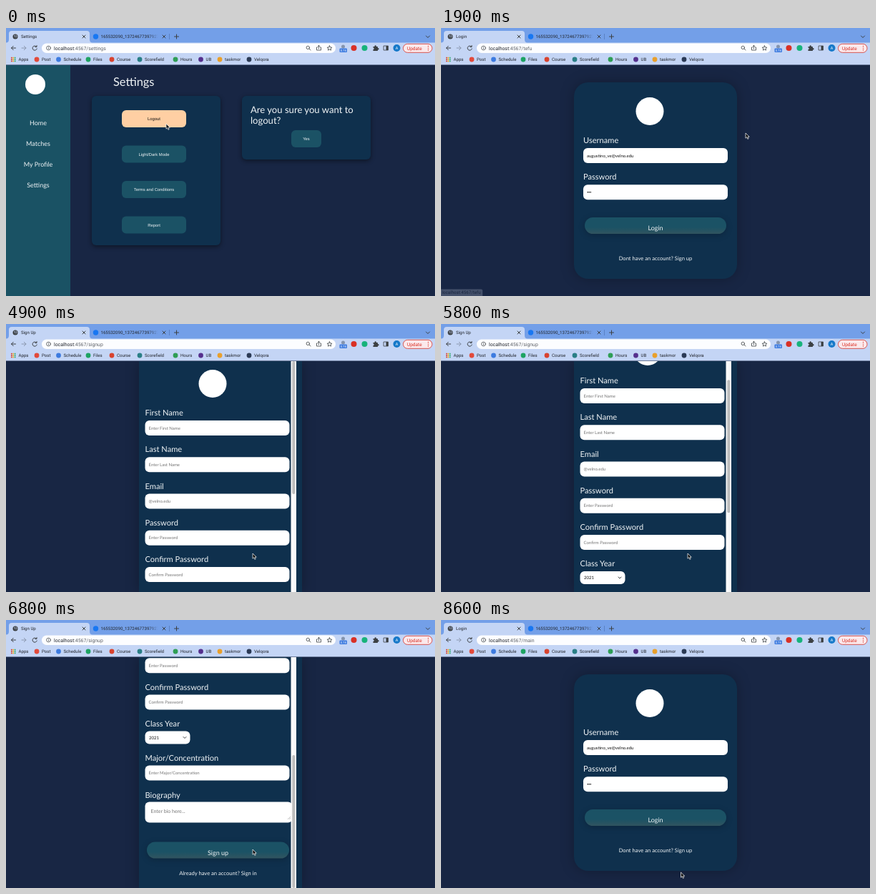
An HTML page that plays this animation: 600 px wide and 375 px high, repeating every 8.7 s.

```html
<!DOCTYPE html>
<html lang="en">
<head>
<meta charset="utf-8">
<title>Account flow</title>
<style>
  html, body { margin: 0; width: 100%; height: 100%; overflow: hidden; background: #182644; }
  svg { display: block; width: 100vw; height: 100vh; }
  text { font-family: Lato, "Open Sans", sans-serif; fill: #f0f4f6; white-space: pre; text-rendering: geometricPrecision; }
  .mid { text-anchor: middle; }
  .ui { font: 6.1px Roboto, Arial, sans-serif; fill: #20242b; }
  .url { font-size: 6.9px; }
  .dim { fill: #5f6368; }
  .btn text { font: 5.85px "Liberation Sans", Arial, sans-serif; text-anchor: middle; }
  .btn rect { fill: #1b5265; }
  .btn.hot rect { fill: #ffcfa3; }
  .btn.hot text { fill: #111; }
  .nav { font-size: 9px; text-anchor: middle; }
  .label { font-size: 11.1px; }
  .hint { font-size: 6px; fill: #757575; }
  .value { font-size: 6px; fill: #111; }
  .foot { font-size: 7.6px; text-anchor: middle; }
  .card { fill: #0f304d; filter: drop-shadow(0 2px 3px #0007); }
  .soft { fill: #0f304d; filter: drop-shadow(0 0 9px #0004); }
  .main { fill: url(#teal); filter: drop-shadow(0 2px 4px #0003); }
  .line { fill: none; stroke: #3c4043; stroke-width: 1; stroke-linecap: round; stroke-linejoin: round; }
</style>
</head>
<body>
<svg viewBox="0 0 600 375" preserveAspectRatio="none">
  <defs>
    <linearGradient id="teal" x2="0" y2="1">
      <stop offset=".6" stop-color="#1b5265"/>
      <stop offset="1" stop-color="#31545f"/>
    </linearGradient>
    <linearGradient id="tabFade" gradientUnits="userSpaceOnUse" x1="200" x2="213">
      <stop stop-color="#20242b"/>
      <stop offset="1" stop-color="#20242b" stop-opacity="0"/>
    </linearGradient>
    <clipPath id="view"><path d="M186 52H399V375H186Z"/></clipPath>
  </defs>
  <rect width="600" height="375" fill="#182644"/>

  <g id="settings">
    <rect y="52" width="90" height="323" fill="#1a5264"/>
    <circle cx="41" cy="79" r="14" fill="#fff"/>
    <g id="nav"></g>
    <text x="150" y="81" font-size="16.4">Settings</text>
    <rect class="card" x="120" y="95" width="180" height="209" rx="6"/>
    <rect class="card" x="330" y="95" width="180" height="89" rx="6"/>
    <text x="342" y="119" font-size="13.1">Are you sure you want to</text>
    <text x="342" y="134" font-size="13.1">logout?</text>
    <g id="buttons"></g>
  </g>

  <g id="login">
    <rect class="soft" x="186" y="76" width="228" height="275" rx="20"/>
    <circle cx="292" cy="116.500" r="19.500" fill="#fff"/>
    <g id="loginFields"></g>
    <g id="filled">
      <text class="value" x="204" y="180.500">augustino_ve@velno.edu</text>
      <path d="M205.200 229.800h.1m1.900 0h.1m1.900 0h.1" stroke="#111" stroke-width="1.600" stroke-linecap="round"/>
    </g>
    <rect class="main" x="201" y="265" width="198" height="23" rx="11.500"/>
    <text class="mid" x="300" y="283" font-size="9">Login</text>
    <text class="foot" x="300" y="324.700">Dont have an account? Sign up</text>
  </g>

  <g id="signup">
    <path class="soft" d="M186 52H414V375H186Z"/>
    <g clip-path="url(#view)">
      <g id="form">
        <circle cx="289" cy="83.500" r="19.500" fill="#fff"/>
        <g id="signupFields"></g>
        <text class="label" x="194.500" y="384">Class Year</text>
        <rect x="194.500" y="391" width="63" height="18" rx="6" fill="#fff"/>
        <text class="value" x="200" y="402.300">2021</text>
        <path class="line" d="M248 399l2 2 2-2"/>
        <text class="label" x="194.500" y="484">Biography</text>
        <rect x="194.500" y="490" width="206" height="29" rx="6" fill="#fff"/>
        <text class="hint" x="202.500" y="505.700" style="font-size:7px">Enter bio here...</text>
        <path d="M394 514.500l4-4M396 514.500l2-2" stroke="#888" stroke-width=".5"/>
        <rect class="main" x="197" y="546" width="199" height="23" rx="11.500"/>
        <text class="mid" x="296.500" y="564" font-size="9">Sign up</text>
        <text class="foot" x="296.500" y="592.700">Already have an account? Sign in</text>
      </g>
    </g>
    <rect x="398.500" y="52" width="7.500" height="323" fill="#fafafa"/>
    <rect id="thumb" x="400.300" y="52" width="4" height="186" rx="2" fill="#bdbdbd"/>
  </g>

  <g id="browser">
    <rect width="600" height="21" fill="#739fe8"/>
    <path d="M0 20.500Q4 20.500 4 16V8Q4 4 8 4H113Q117 4 117 8V16Q117 20.500 121 20.500H600V51.600H0Z" fill="#c4d5f5"/>
    <text class="ui" id="title" x="21" y="14.200"></text>
    <g id="globe"><circle cx="13" cy="12" r="3.500" fill="#3c4043"/><path d="M11 10l2 1-1 2M14 9.500l1 2-1 2" fill="none" stroke="#c4d5f5" stroke-width=".7"/></g>
    <path id="spinner" d="M9.500 12A3.500 3.500 0 0 1 14.750 8.970" fill="none" stroke="#3f7de8"/>
    <circle cx="125.500" cy="12" r="3.700" fill="#1877f2"/>
    <text class="ui" x="132.500" y="14.200" style="fill:url(#tabFade)">165532090_13724677397927</text>
    <path class="line" d="M107 10l4 4m0-4l-4 4M219 10l4 4m0-4l-4 4M235.500 12h6m-3-3v6M587.500 11l2.500 2.500 2.500-2.500"/>
    <path d="M228.500 8v8" stroke="#4a6fae" stroke-width=".6"/>

    <path class="line" d="M13.500 28h-6m2.700-2.700L7.500 28l2.700 2.700"/>
    <path class="line" d="M22 28h6m-2.700-2.700L28 28l-2.700 2.700" style="stroke:#8a97ae"/>
    <path id="reload" class="line" d="M42.500 26A3.100 3.100 0 1 0 43.200 29M43 24.500v2h-2"/>
    <path id="stop" class="line" d="M37.500 25.500l5 5m0-5l-5 5"/>
    <rect x="50" y="21.500" width="411" height="13.500" rx="6.750" fill="#fcfdff"/>
    <circle class="line" cx="59.500" cy="28" r="2.900" style="stroke-width:.7"/>
    <path class="line" d="M59.500 27.800v1.500m0-3v.1" style="stroke-width:.7"/>
    <text class="ui url" x="67" y="30.500">localhost<tspan class="dim" id="path"></tspan></text>
    <g class="line" style="stroke-width:.8">
      <circle cx="422.300" cy="27.400" r="2.200"/>
      <path d="M424 29l2 2M435.500 27h-1v4h6v-4h-1M437.500 29v-4.500m-1.500 1.300l1.500-1.500 1.500 1.500"/>
      <path d="M452.500 24.800l1 2.200 2.400.200-1.800 1.600.5 2.300-2.100-1.200-2.100 1.200.5-2.300-1.800-1.600 2.400-.2Z"/>
      <rect x="528.500" y="25" width="6" height="6"/>
    </g>
    <path d="M531.500 25h3v6h-3Z" fill="#3c4043"/>
    <circle cx="471.500" cy="26" r="2.500" fill="#8494ad"/>
    <rect x="466.500" y="28.500" width="10.500" height="5.500" rx="1" fill="#3d7be0"/>
    <text class="mid" x="471.750" y="32.900" style="font:4.200px Roboto,sans-serif">0.78</text>
    <circle cx="486.500" cy="28" r="4" fill="#d93025"/>
    <circle cx="501.500" cy="28" r="4" fill="#17b37b"/>
    <path d="M513.500 26h2v-.5a1.200 1.200 0 0 1 2.400 0v.5h2v2h.5a1.200 1.200 0 0 1 0 2.400h-.5v1.600h-6.400v-2a1.200 1.200 0 0 0 0-2.400Z" fill="#3c4043"/>
    <circle cx="546.500" cy="28" r="5" fill="#1679c9"/>
    <text class="ui mid" x="546.500" y="30" style="fill:#fff;font-size:5.500px">A</text>
    <rect x="555.500" y="22.300" width="40.500" height="12" rx="6" fill="#fbe9ec" stroke="#d93025" stroke-width=".8"/>
    <text class="ui" x="561" y="30.500" style="fill:#d93025;font-size:6.500px">Update</text>
    <path d="M590.500 25.500v.1m0 2.500v.1m0 2.500v.1" stroke="#d93025" stroke-width="1.300" stroke-linecap="round"/>
    <g id="marks"></g>
  </g>

  <g id="status">
    <path id="statusBox" fill="#dee5f1"/>
    <text class="ui" id="statusText" x="1.500" y="372.300" style="font-size:6.200px"></text>
  </g>
  <path id="cursor" d="M0 0V7.200L1.700 5.700 2.900 8.400 4.200 7.800 3 5.200H5.300Z" fill="#111" stroke="#fff" stroke-width=".7"/>
</svg>
<script>
const LOOP = 8700, STEP = 100;
const $ = id => document.getElementById(id);
const fill = (id, items, draw) => { $(id).innerHTML = items.map(draw).join(""); };

fill("nav", ["Home", "Matches", "My Profile", "Settings"],
  (name, i) => `<text class="nav" x="45" y="${135.5 + i * 29}">${name}</text>`);

const button = (id, name, x, y, w) => `<g class="btn" id="${id}">
  <rect x="${x}" y="${y}" width="${w}" height="24" rx="6"/>
  <text x="${x + w / 2}" y="${y + 14}">${name}</text></g>`;
fill("buttons", ["Logout", "Light/Dark Mode", "Terms and Conditions", "Report"],
  (name, i) => button("choice" + i, name, 162, 115 + i * 49.5, 90));
$("buttons").innerHTML += button("yes", "Yes", 399, 143, 42);

const field = (x, y, name, hint = "") => `
  <text class="label" x="${x}" y="${y - 7}">${name}</text>
  <rect x="${x}" y="${y}" width="202" height="21" rx="6" fill="#fff"/>
  <text class="hint" x="${x + 5}" y="${y + 12.5}">${hint}</text>`;
fill("loginFields", ["Username", "Password"], (name, i) => field(199, 168 + i * 51.3, name));
fill("signupFields", [
  ["First Name", "Enter First Name", 135],
  ["Last Name", "Enter Last Name", 186.3],
  ["Email", "@velno.edu", 237.5],
  ["Password", "Enter Password", 288.8],
  ["Confirm Password", "Confirm Password", 340],
  ["Major/Concentration", "Enter Major/Concentration", 439]
], ([name, hint, y]) => field(194.5, y, name, hint));

fill("marks", [
  ["Post", 43, "#e24a3b"], ["Schedule", 73.5, "#3d7be0"], ["Files", 115, "#1ea362"],
  ["Course", 148, "#d8432f"], ["Scorefield", 187, "#2a7f86"], ["Hours", 237, "#2f9e55"],
  ["UB", 272.5, "#55308d"], ["taskmor", 299, "#e9a02c"], ["Velqora", 340, "#2b3a55"]
], ([name, x, color]) => `<circle cx="${x}" cy="44" r="3.4" fill="${color}"/>
  <text class="ui" x="${x + 7}" y="46.200">${name}</text>`);
const dots = ["#d93025", "#f2a600", "#1ea362"];
for (let i = 0; i < 9; i++)
  $("marks").innerHTML += `<rect x="${7 + i % 3 * 2.4}" y="${40.8 + (i / 3 | 0) * 2.4}" width="1.6" height="1.6" fill="${dots[i % 3]}"/>`;
$("marks").innerHTML += '<text class="ui" x="17.500" y="46.200">Apps</text>';

// Each cue changes only the listed parts of the state.
const cues = [
  [0, { page: "settings", title: "Settings", path: "settings", busy: false, link: "", fade: 1, filled: false }],
  [1000, { link: "tefu" }],
  [1200, { busy: true }],
  [1400, { page: "login", title: "Login", path: "tefu" }],
  [1700, { busy: false, filled: true }],
  [1900, { fade: 0.22 }],
  [2000, { link: "", fade: 1 }],
  [2800, { link: "signup" }],
  [3800, { link: "", title: "Sign Up", path: "signup", busy: true }],
  [4100, { page: "signup" }],
  [4500, { busy: false }],
  [7600, { link: "main" }],
  [8000, { busy: true }],
  [8300, { page: "login", title: "Login", path: "main", link: "" }],
  [8500, { busy: false }]
];
const moves = [[0, 224, 134], [900, 426, 147], [1900, 426, 147], [2700, 345, 321], [6800, 345, 321], [7500, 335.5, 353]];
const scrolls = [[5700, 0], [5800, 45], [5900, 145], [6000, 222], [6200, 231], [6600, 235.5]];
const smooth = u => u * u * (3 - 2 * u);

function along(points, t, ease) {
  const n = points.findIndex(p => p[0] > t);
  if (n === 0) return points[0].slice(1);
  if (n < 0) return points.at(-1).slice(1);
  const [a, b] = [points[n - 1], points[n]];
  const u = ease((t - a[0]) / (b[0] - a[0]));
  return a.slice(1).map((v, i) => v + (b[i + 1] - v) * u);
}
const show = (id, on) => { $(id).style.display = on ? "" : "none"; };
const inside = (x, y, l, t, r, b) => x > l && x < r && y > t && y < b;

function draw(t) {
  const s = Object.assign({}, ...cues.filter(c => c[0] <= t).map(c => c[1]));
  for (const page of ["settings", "login", "signup"]) show(page, page === s.page);
  $("title").textContent = s.title;
  $("path").textContent = ":4567/" + s.path;
  show("globe", !s.busy);
  show("reload", !s.busy);
  show("spinner", s.busy);
  show("stop", s.busy);
  show("filled", s.filled);
  $("spinner").setAttribute("transform", `rotate(${(t - 3800) * 0.36} 13 12)`);

  show("status", s.link);
  if (s.link) {
    const label = $("statusText");
    label.textContent = "localhost:4567/" + s.link;
    $("status").style.opacity = s.fade;
    $("statusBox").setAttribute("d", `M0 365.5H${label.getComputedTextLength() + 2}q2 0 2 2V375H0Z`);
  }

  const [x, y] = along(moves, t, smooth);
  $("cursor").setAttribute("transform", `translate(${x} ${y})`);
  $("choice0").classList.toggle("hot", inside(x, y, 162, 115, 252, 139));
  $("yes").classList.toggle("hot", inside(x, y, 399, 143, 441, 167));

  const [top] = along(scrolls, t, u => u);
  $("form").setAttribute("transform", `translate(0 ${-top})`);
  $("thumb").setAttribute("y", 52 + top / 235.5 * 137);
}

const start = performance.now();
function tick() {
  const t = (performance.now() - start) % LOOP;
  draw(Math.floor(t / STEP) * STEP);
  requestAnimationFrame(tick);
}
tick();
</script>
</body>
</html>
```
